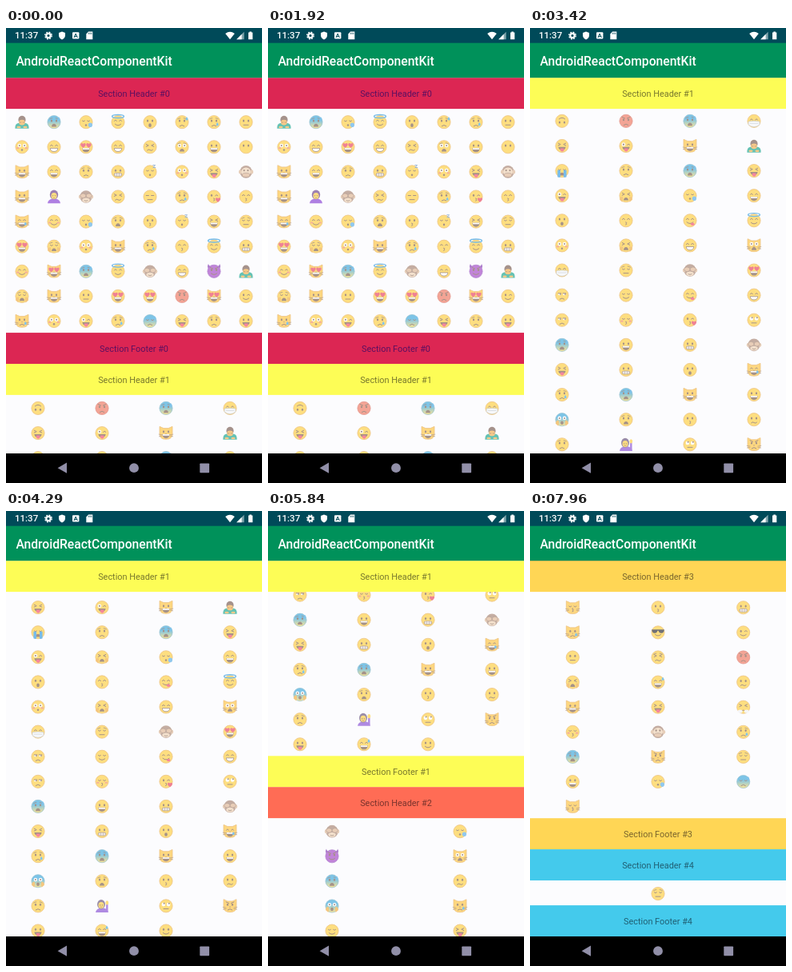
An HTML page that plays this animation: 320 px wide and 569 px high, repeating every 8000 ms.

```html
<!DOCTYPE html>
<html lang="en">
<head>
<meta charset="utf-8">
<title>Sectioned emoji list</title>
<style>
  html, body { margin: 0; width: 100%; height: 100%; overflow: hidden; background: #000; }
  svg { display: block; width: 100%; height: 100%; }
  text { font-family: Roboto, "Noto Sans", sans-serif; }
  .label { font-size: 10.9px; text-anchor: middle; }
</style>
</head>
<body>
<svg id="stage" viewBox="0 0 320 569">
  <defs id="defs">
    <linearGradient id="chill" x2="0" y2="1">
      <stop offset=".35" stop-color="#2aa0d8"/>
      <stop offset="1" stop-color="#ffd54a"/>
    </linearGradient>
  </defs>
  <rect width="320" height="569" fill="#fcfcfe"/>
  <g id="list"></g>
  <g id="headers"></g>

  <rect width="320" height="62.2" fill="#00915a"/>
  <rect width="320" height="18.7" fill="#004a59"/>
  <g fill="#fff">
    <text x="12.4" y="46.6" font-size="15.66" font-weight="500">AndroidReactComponentKit</text>
    <text x="11" y="13.4" font-size="11.5" font-weight="500">11:37</text>
    <circle cx="53" cy="9.5" r="2.7" fill="none" stroke="#fff" stroke-width="2.2"/>
    <circle cx="53" cy="9.5" r="4.3" fill="none" stroke="#fff" stroke-width="1.3" stroke-dasharray="1.9 1.48"/>
    <path d="M70 4.5l4 1.6v3q0 3.6-4 5.4-4-1.8-4-5.4v-3z"/>
    <rect x="83" y="5.2" width="8.4" height="8.4" rx="1"/>
    <path d="M85 12l2.2-5 2.2 5M85.8 10.4h2.8" fill="none" stroke="#004a59"/>
    <path d="M103 4.6h5.3v9.6h-8V7.4z"/>
    <path d="M103.2 5.8v2M105 5.8v2M106.8 5.8v2" stroke="#004a59" stroke-width=".8"/>
    <path d="M274.2 7q5.8-4.6 11.6 0l-5.8 7.2z"/>
    <path d="M297.6 4.8v9.4h-9.4z" fill-opacity=".5"/>
    <path d="M294.6 7.8v6.4h-6.4z"/>
    <path d="M303 5.6h1.4V4.5h2.4v1.1h1.5v8.6H303z"/>
  </g>

  <rect y="532" width="320" height="37" fill="#000"/>
  <g fill="#918fa8">
    <path d="M76 543.6v13.2L64.6 550.2z"/>
    <circle cx="160" cy="550.2" r="5.9"/>
    <rect x="242.3" y="544.4" width="11.8" height="11.8" rx=".8"/>
  </g>
</svg>
<script>
const LOOP = 8000, TOP = 62.2, BOTTOM = 532, BAND = 38.9, ROW = 31.11, WIDTH = 320;
const SNAP = 4; // a header this close to the top is already pinned
const INK = '#6d4c3a', GOLD = '#ffcb2e', RIM = '#e0962a';

// ---- emoji drawing, centred on 0,0 with a radius of about 8 ----
const path = (d, attrs = '') => `<path d="${d}" ${attrs}/>`;
const line = (d, width = 1, color = INK) =>
  path(d, `fill="none" stroke="${color}" stroke-width="${width}" stroke-linecap="round" stroke-linejoin="round"`);
const oval = (x, y, rx, ry, fill = INK, more = '') =>
  `<ellipse cx="${x}" cy="${y}" rx="${rx}" ry="${ry}" fill="${fill}" ${more}/>`;
const pair = shape => shape + `<g transform="scale(-1 1)">${shape}</g>`;
const ball = (fill, rim) => oval(0, 0, 8.1, 8.1, fill, `stroke="${rim}" stroke-width=".7"`);
const fill = color => `fill="${color}"`;
const heart = (x, y, s) =>
  `<g transform="translate(${x} ${y}) scale(${s})">${path('M0 2.6C-5-.6-2-4 0-1.6 2-4 5-.6 0 2.6z', fill('#e8304f'))}</g>`;
const drop = (x, y) => path(`M${x} ${y}q3 3.6 0 4.4q-3-.8 0-4.4z`, fill('#2f9fe0'));
const fur = oval(0, 0, 7.6, 7.8, '#a07a66') + pair(oval(7.2, 0, 2, 2.6, '#d9b08c'));
const body = shirt => path('M-8 8.2Q-7.500 2.500 0 2.500Q7.500 2.500 8 8.200z', fill(shirt));

const parts = {
  // heads
  face: ball(GOLD, RIM),
  cold: ball('url(#chill)', '#4d98b5'),
  red: ball('#ee6a50', '#cf4c3c'),
  imp: pair(path('M3-6.400Q6.500-6 7-9.200Q9.400-5.400 6.400-2.800z', fill('#7a2cae'))) + ball('#9a36c0', '#7a2cae'),
  cat: path('M-8-8.200L-3-6H3L8-8.200V1Q8 7.800 0 7.800Q-8 7.800-8 1z', `fill="#ffc02e" stroke="${RIM}" stroke-width=".7"`)
    + pair(line('M5 2.200L8.800 1.600M5 3.600L8.600 4.200', .6)) + path('M-1 .8h2L0 2z', fill(INK)),

  // eyes
  dot: pair(oval(3, -1.7, 1.1, 1.5)),
  arc: pair(line('M1.600-1.300Q3.100-4 4.600-1.300')),
  shut: pair(line('M1.600-1.600Q3.100.2 4.600-1.600')),
  dash: pair(line('M1.600-1.500H4.800')),
  squint: pair(line('M4.800-3.400L1.800-1.900L4.800-.5')),
  wide: pair(oval(3.1, -1.8, 2.3, 2.3, '#fff') + oval(3.1, -1.8, 1, 1)),
  roll: pair(oval(3.1, -1.8, 2.3, 2.3, '#fff')) + oval(-2.4, -3.1, 1, 1) + oval(3.8, -3.1, 1, 1),
  love: pair(heart(3.5, -2, 1.15)),
  wink: oval(-3, -1.7, 1.1, 1.5) + line('M1.600-1.300Q3.100-3.600 4.800-1.300'),
  zany: oval(-3.1, -1.8, 2.3, 2.3, '#fff') + oval(-3.1, -1.8, 1.1, 1.1) + line('M1.600-1.300Q3.100-3.600 4.800-1.300'),
  lid: pair(oval(3, -1.2, 1.8, 1.2, '#fff') + line('M1.200-2.300H4.900')) + oval(-2, -1.2, .9, .9) + oval(4, -1.2, .9, .9),
  shades: path('M-7.800-3.600H7.800Q7.600.8 4.200.8Q1.200.8.6-2.200H-.6Q-1.200.8-4.200.8Q-7.600.8-7.800-3.600z', fill('#17171c')),

  // mouths
  smile: line('M-3.600 2.600Q0 5.800 3.600 2.600'),
  grin: path('M-4.800 1.400H4.800Q4 6.600 0 6.600Q-4 6.600-4.800 1.400z', fill(INK)) + path('M-4.200 1.500H4.200V3.200H-4.200z', fill('#fff')),
  teeth: path('M-4.800 1.600H4.800Q4.400 5.800 0 5.800Q-4.400 5.800-4.800 1.600z', `fill="#fff" stroke="${INK}" stroke-width=".8"`),
  grit: `<rect x="-4.800" y="1.600" width="9.600" height="3.800" rx="1.800" fill="#fff" stroke="${INK}" stroke-width=".7"/>`
    + line('M-4.500 3.500H4.500M-1.600 1.800V5.200M1.600 1.800V5.200', .4),
  frown: line('M-2.800 5Q0 2.400 2.800 5'),
  flat: line('M-3 3.600H3'),
  gape: oval(0, 4, 1.8, 2.3),
  small: oval(0, 3.8, 1.2, 1.3),
  wail: path('M-3 5.800Q-2.600 2.200 0 2.200Q2.600 2.200 3 5.800z', fill(INK)),
  kiss: line('M-.4 2Q2 2.400.2 3.600Q2 4.400-.4 5.200', 1),
  tongue: path('M-4.600 1.400H4.600Q4 5.400 0 5.400Q-4 5.400-4.600 1.400z', fill(INK)) + path('M-2 3H2.400V5.800Q.2 8.400-2 5.800z', fill('#f2395c')),
  lick: line('M-4 2Q0 5.600 4 2') + oval(3.2, 4.4, 2.3, 1.7, '#f2395c'),
  wave: line('M-3.400 4.200Q-1.800 2.200 0 3.800T3.400 3.600'),

  // extras
  worry: pair(line('M2.200-5Q4-4.900 5.400-3.800', .8)),
  anger: pair(line('M1.400-3.400L5-5')),
  blush: pair(oval(5.2, 1.4, 1.7, 1.1, '#f2785c')),
  tear: drop(4.2, .4),
  sweat: drop(6, -6.4),
  stream: pair(path('M2-.8H5.600V7.600Q3.400 8.800 2 7.800z', fill('#2090dc'))),
  bubble: oval(5.4, 3.6, 2.6, 2.8, '#4aa6e4'),
  zzz: line('M3.800-8.400H6.600L3.800-5.400H6.800', .9, '#4b83bb'),
  halo: oval(0, -7.2, 7.4, 2, 'none', 'stroke="#1a8fd8" stroke-width="1.400"'),
  peck: heart(5, 4, 1.1),
  mask: path('M-7 .6Q0-.6 7 .6V4.600Q0 10-7 4.600z', 'fill="#f5f7fa" stroke="#8e9aa6" stroke-width=".5"') + line('M-5 3H5', .5, '#8e9aa6'),
  hands: pair(path('M4.600 8Q3.200 3 4.600.8Q7.800 1.400 8 5z', fill('#f0a52c'))),
  puff: pair(oval(4, 5.4, 3, 2, '#f1f3f6')),

  // whole figures
  blind: fur + oval(0, 4.2, 4.6, 2.8, '#efd0ae') + line('M-2 4.800Q0 6 2 4.800', .8)
    + pair(oval(3.7, -1.2, 3.6, 2.8, '#dcae88', 'stroke="#80604f" stroke-width=".6"')),
  mute: fur + oval(0, 0, 5.8, 5.4, '#efd0ae') + pair(oval(2.4, -1.8, 1, 1.2))
    + oval(0, 4, 4.8, 2.6, '#dcae88', 'stroke="#80604f" stroke-width=".6"'),
  bow: path('M-8.600 8.200Q-9 1.500-4 1H4Q9 1.500 8.600 8.200z', fill('#009c84')) + oval(0, -2.8, 4.6, 5, '#6d4c41')
    + oval(0, .4, 3.9, 3.4, '#f4a93c') + pair(line('M1.200.4H2.600', .7) + oval(4, 6.4, 2.6, 1.3, '#f4a93c')),
  raise: body('#7d3fd0') + oval(-1, -2, 5, 6, '#5b4470') + oval(-1, -.8, 3.5, 4, GOLD)
    + line('M6.300 6V-2', 2.4, '#7d3fd0') + oval(6.3, -4, 1.9, 2.6, GOLD) + oval(-2.3, -1, .6, .8) + oval(.3, -1, .6, .8) + line('M-2.200 1.300Q-1 2.400.2 1.300', .7),
  pout: body('#7d2fd0') + oval(0, -2.4, 5.2, 6, '#5f3080') + oval(0, -1, 3.5, 4, GOLD)
    + pair(oval(1.4, -1.2, .6, .8)) + line('M-1.200 1.800Q0 .8 1.200 1.800', .7),
};

const recipes = {
  '😀': 'face dot grin', '😃': 'face dot grin', '😄': 'face arc grin', '😁': 'face arc teeth',
  '😅': 'face arc grin sweat', '😆': 'face squint grin', '😊': 'face arc smile blush', '🙂': 'face dot smile',
  '🙃': 'face dot smile', '😉': 'face wink smile', '😋': 'face arc lick', '😛': 'face dot tongue',
  '😜': 'face zany tongue', '😝': 'face squint tongue', '😍': 'face love grin', '😘': 'face wink kiss peck',
  '😗': 'face dot kiss', '😙': 'face arc kiss', '😚': 'face shut kiss blush', '😎': 'face shades smile',
  '😇': 'face arc smile halo', '😐': 'face dot flat', '😑': 'face dash flat', '😶': 'face dot',
  '😬': 'face dot grit', '🙄': 'face roll flat', '😒': 'face lid frown', '😌': 'face shut smile',
  '😔': 'face shut flat worry', '😪': 'face shut small bubble', '😴': 'face shut small zzz', '😷': 'face arc mask',
  '😕': 'face dot wave', '😟': 'face dot frown worry', '😦': 'face dot wail worry', '😧': 'face wide wail worry',
  '😮': 'face dot gape', '😳': 'face wide small blush', '😢': 'face dot frown worry tear', '😥': 'face dot frown worry sweat',
  '😭': 'face shut wail stream', '😣': 'face squint wave', '😖': 'face squint wave worry', '😫': 'face squint wail hands',
  '😩': 'face shut wail worry hands', '😤': 'face squint frown puff', '😡': 'red dot frown anger', '😈': 'imp dot smile anger',
  '😰': 'cold dot wail worry sweat', '😓': 'cold shut frown sweat', '😱': 'cold wide gape hands',
  '😺': 'cat dot grin', '😹': 'cat arc grin tear', '😻': 'cat love grin', '😽': 'cat shut kiss',
  '😿': 'cat dot frown tear', '😾': 'cat dot frown anger', '🙀': 'cat wide wail',
  '🙈': 'blind', '🙊': 'mute', '🙇': 'bow', '🙋': 'raise', '🙎': 'pout',
};

// ---- list content ----
const sections = [
  { cols: 8, color: '#dc2653', ink: '#5c1060', items:
    '🙇😰😪😇😮😥😢😐' + '😳😁😍😁😣😧😀😶' + '😺😄😟😬😴😳😝🙊' +
    '😺🙎🙈😣😑😢😘😙' + '😹😊😪😦😗😴😆😔' + '😍😩😳😺😢😙😇😬' +
    '😊😻😰😇🙈😁😈🙇' + '😩😺😐😍😍😡😻😉' + '😿😳😜😢😓😝😟😛' },
  { cols: 4, color: '#fdfd56', items:
    '🙃😡😰😷' + '😝😜😺🙇' + '😭😟😰😝' + '😜😫😪😄' + '😮😙😋😇' +
    '😳😫😁🙀' + '😷😔🙈😍' + '😒😌😋😁' + '😒😚😘🙄' + '😰😀😬🙈' +
    '😝😬😮😹' + '😢😰😺😀' + '😱😦😗😕' + '😟🙋🙄😾' + '😛😅🙂' },
  { cols: 2, color: '#ff6c55', items: '🙈😪' + '😈🙀' + '😰😕' + '😱😿' + '😌😝' + '😾😐' + '😟😆' + '😣😦' + '😋😬' + '😗😺' },
  { cols: 3, color: '#ffd655', items:
    '😽😗😬' + '😿😎😉' + '😐😖😡' + '😫😅😕' + '😺😝😤' + '😚🙊😢' + '😰😾😔' + '😀😪😓' + '😽' },
  { cols: 1, color: '#44caec', items: '😔' },
];

const $ = id => document.getElementById(id);
const symbolId = emoji => 'e' + emoji.codePointAt(0).toString(16);
const band = (y, { color, ink = 'rgba(0, 0, 10, .53)' }, text) =>
  `<rect y="${y}" width="${WIDTH}" height="${BAND}" fill="${color}"/>` +
  `<text class="label" x="160" y="${y + 23.6}" fill="${ink}">${text}</text>`;

$('defs').innerHTML += Object.entries(recipes).map(([emoji, recipe]) => {
  const flip = emoji === '🙃' ? ' transform="rotate(180)"' : '';
  return `<g id="${symbolId(emoji)}"${flip}>${recipe.split(' ').map(name => parts[name]).join('')}</g>`;
}).join('');

let y = TOP, listMarkup = '', headerMarkup = '';
const headerTops = [];
sections.forEach((section, i) => {
  const { cols, items } = section;
  headerTops.push(y);
  headerMarkup += `<g>${band(0, section, 'Section Header #' + i)}</g>`;
  y += BAND;
  const cells = [...items];
  const uses = cells.map((emoji, n) => {
    const cx = (n % cols + .5) * WIDTH / cols;
    const cy = y + (Math.floor(n / cols) + .5) * ROW + 1;
    return `<g transform="translate(${cx} ${cy})"><use href="#${symbolId(emoji)}"/></g>`;
  });
  listMarkup += `<g opacity=".6">${uses.join('')}</g>`;
  y += Math.ceil(cells.length / cols) * ROW;
  listMarkup += band(y, section, 'Section Footer #' + i);
  y += BAND;
});
$('list').innerHTML = listMarkup;
$('headers').innerHTML = headerMarkup;
const headers = [...$('headers').children];

// ---- motion: three flings that slow down ----
const flings = [
  { start: 2343, time: 1500, to: 386, power: 2.1 },
  { start: 5236, time: 1260, to: 705.6, power: 2 },
  { start: 6810, time: 1130, to: y - BOTTOM, power: 2 },
];

function scrollAt(t) {
  let pos = 0;
  for (const { start, time, to, power } of flings) {
    const u = Math.min(1, Math.max(0, (t - start) / time));
    pos += (to - pos) * (1 - (1 - u) ** power);
  }
  return pos;
}

function render(t) {
  const scroll = scrollAt(t);
  $('list').setAttribute('transform', `translate(0 ${-scroll})`);
  // From the last to the first: a pinned header is pushed out by the one after it.
  let next = Infinity;
  for (let i = headers.length - 1; i >= 0; i--) {
    const own = headerTops[i] - scroll;
    next = own < TOP + SNAP ? Math.min(TOP, next - BAND) : own;
    headers[i].setAttribute('transform', `translate(0 ${Math.max(next, -BAND)})`);
  }
}

const begin = performance.now();
function tick() {
  render((performance.now() - begin) % LOOP);
  requestAnimationFrame(tick);
}
tick();
</script>
</body>
</html>
```
